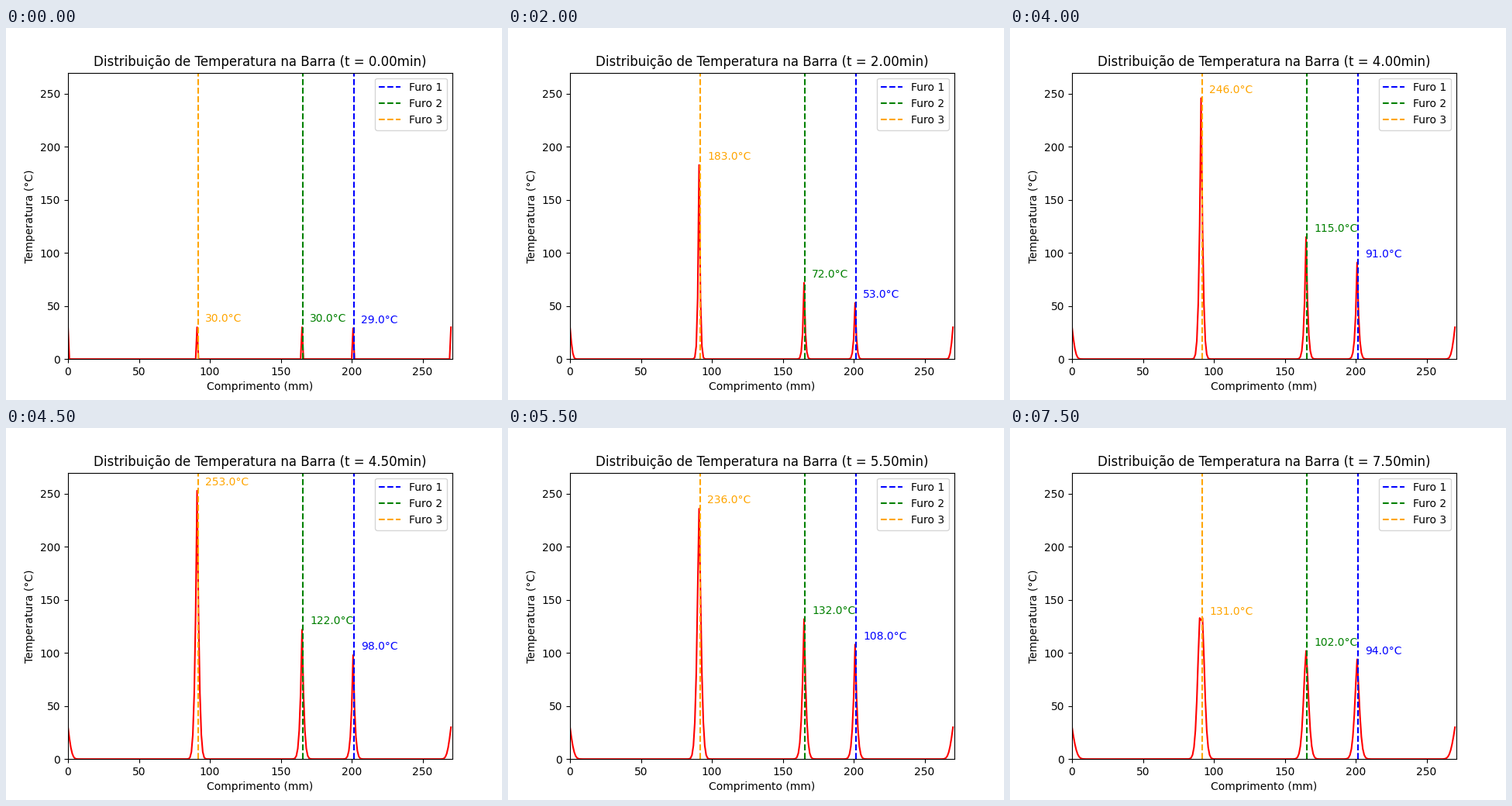
These frames come from a looping animation (640x480 px, 8 s). A matplotlib script:

```python
import numpy as np
import matplotlib.pyplot as plt
from matplotlib.animation import FuncAnimation

FRAMES, STEP_MIN = 16, 0.5
LENGTH, END_TEMP = 270, 30
FOURIER = 0.255  # diffusivity * dt / dx²


class Hole:
    """Thermocouple hole: S-shaped heating, then exponential cooling."""

    def __init__(self, name, color, pos, start, rise, half_time, order,
                 cool_from, cool_rate):
        self.name, self.color, self.pos = name, color, pos
        self.start, self.rise = start, rise
        self.half_time, self.order = half_time, order
        self.cool_from, self.cool_rate = cool_from, cool_rate
        self.node = int(pos)

    def temp(self, t):
        heat = t**self.order / (self.half_time**self.order + t**self.order)
        cool = np.exp(-self.cool_rate * max(t - self.cool_from, 0))
        return round(self.start + self.rise * heat * cool)


HOLES = [
    Hole("Furo 1", "blue", 201.6, start=29, rise=110, half_time=3.57,
         order=2.18, cool_from=5.894, cool_rate=0.215),
    Hole("Furo 2", "green", 165.5, start=30, rise=130, half_time=2.89,
         order=1.985, cool_from=5.80, cool_rate=0.2654),
    Hole("Furo 3", "orange", 91.75, start=30, rise=260, half_time=1.64,
         order=1.79, cool_from=5.175, cool_rate=0.379),
]


def simulate():
    """Explicit heat diffusion, one step per frame, with driven holes."""
    temp = np.zeros(LENGTH + 1)
    temp[[0, -1]] = END_TEMP
    profiles = []
    for i in range(FRAMES):
        temp[1:-1] += FOURIER * np.diff(temp, 2) if i else 0
        for hole in HOLES:
            temp[hole.node] = hole.temp(i * STEP_MIN)
        profiles.append(temp.copy())
    return profiles


x = np.arange(LENGTH + 1)
profiles = simulate()

fig, ax = plt.subplots(figsize=(6.4, 4.8), dpi=100)
ax.set_xlim(0, LENGTH + 1)
ax.set_ylim(0, 270)
ax.set_xlabel("Comprimento (mm)")
ax.set_ylabel("Temperatura (°C)")
title = ax.set_title("")
curve, = ax.plot([], [], color="red")

labels = []
for hole in HOLES:
    ax.axvline(hole.pos, color=hole.color, linestyle="--", label=hole.name)
    labels.append(ax.text(hole.pos + 5, 0, "", color=hole.color))
ax.legend(loc="upper right")


def update(i):
    curve.set_data(x, profiles[i])
    title.set_text(f"Distribuição de Temperatura na Barra (t = {i * STEP_MIN:.2f}min)")
    for hole, label in zip(HOLES, labels):
        value = profiles[i][hole.node]
        label.set_y(value + 5)
        label.set_text(f"{value:.1f}°C")
    return [curve, title, *labels]


anim = FuncAnimation(fig, update, frames=FRAMES, interval=500,
                     repeat=True, repeat_delay=0, blit=False)
plt.show()
```
